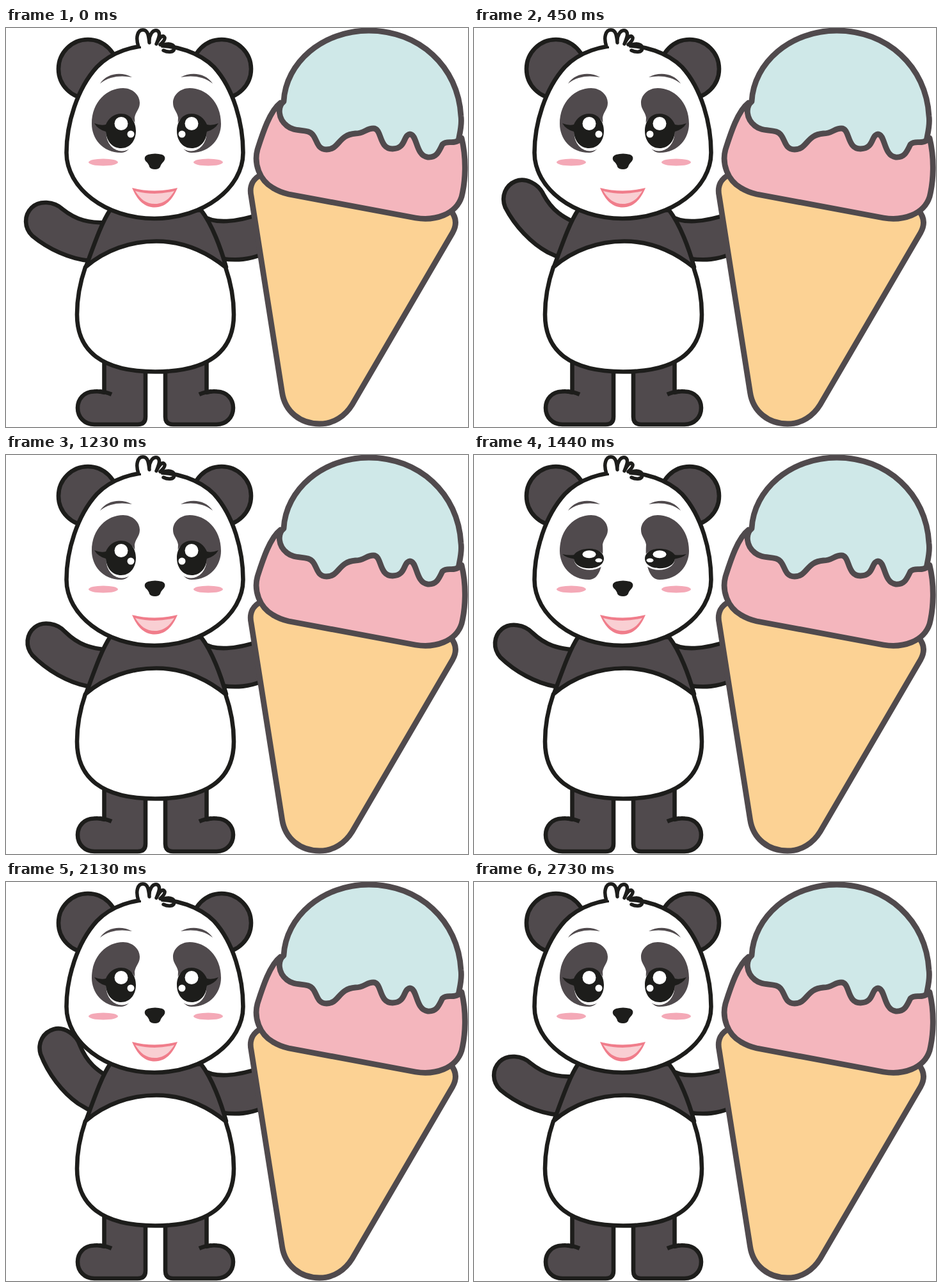
These frames come from a looping animation (722 px wide and 624 px high, 2.76 s). An HTML page:

```html
<!DOCTYPE html>
<html lang="en">
<head>
<meta charset="utf-8">
<title>Waving panda with ice cream</title>
<style>
  html, body { margin: 0; width: 100%; height: 100%; overflow: hidden; background: #fff; }
  svg { display: block; width: 100%; height: 100%; }
  .line { stroke: #1d1d1b; stroke-width: 6.6; stroke-linecap: round; stroke-linejoin: round; }
  .ice { stroke: #504a4d; stroke-width: 8.8; stroke-linejoin: round; }
  .hair { stroke: #1d1d1b; stroke-width: 5.5; stroke-linecap: round; stroke-linejoin: round; }
  .fur { fill: #504a4d; }
  .white { fill: #fff; }
  .ink { fill: #1d1d1b; }
  .none { fill: none; }
</style>
</head>
<body>
<svg viewBox="0 0 722 624">
  <defs>
    <g id="leg" class="line">
      <path class="fur" d="M153.500 515V570C148 568 143 568 137 568.5C122 569 112 580 112 594C112 609 123 620 138 620H206Q218 620 218 608V515Z"/>
      <path class="none" stroke-linecap="butt" d="M146 568.500Q156 569 165 573"/>
    </g>
    <g id="patch" class="fur">
      <path d="M183 94C198 94 209 105 209 117C209 127 203 130 201 140C203 172 196 195 180 195C150 195 134 172 134 150C134 115 158 94 183 94Z"/>
      <path d="M147 87C158 70 181 68 197 77C180 74 162 75 147 87Z"/>
    </g>
    <g id="eye">
      <ellipse class="white" cx="181" cy="164" rx="24.500" ry="28.500"/>
      <path class="ink" d="M138 149Q148 153 156 151C160 141 169 134 180 134C195 134 203 147 203 161C203 177 193 188 180 188C167 188 157 178 156 162Q144 159 138 149Z"/>
      <circle class="white" cx="180" cy="149.500" r="10.500"/>
      <circle class="white" cx="195" cy="166" r="5.500"/>
    </g>
  </defs>

  <g class="line">
    <path id="arm" class="fur" d="M175 304C127 307 108 299 88 283C75 271 52 269 40 281C28 293 28 312 41 325C66 346 100 361 130 364L165 365Z"/>
    <path class="fur" d="M306 293C325 307 360 304 400 290V354C380 362 362 364 338 361Z"/>
  </g>
  <use href="#leg"/>
  <use href="#leg" transform="translate(467) scale(-1 1)"/>
  <g class="line">
    <path class="fur" d="M163 284C149 305 138 338 125 373L344 374C336 345 322 307 305 285Z"/>
    <path class="white" d="M124 374C155 347 195 333.500 235 333.500C275 333.500 312 349 343 374C352 400 356 425 356 448C356 505 318 537.500 233 537.500C150 537.500 111 505 111 448C111 425 115 400 124 374Z"/>
    <circle class="fur" cx="128" cy="64" r="46"/>
    <circle class="fur" cx="337" cy="64" r="46"/>
    <path class="white" d="M232 27C200 27 165 37 142 61C111 95 94.500 150 94.500 195C94.500 250 155 298 232 298C309 298 370.500 250 370.500 195C370.500 150 356 95 325 61C302 38 266 27 232 27Z"/>
  </g>
  <path class="white" d="M211 20H238L245 36H211Z"/>
  <g class="hair">
    <path class="white" d="M207 29C202 14 206 3 214 3C222 3 223 13 224 23C223 12 229 2 236 4C243 7 238 17 235 25C239 16 245 9 248 15C249 19 244 23 241 26"/>
    <path class="none" d="M245 27C253 23 263 25 263 32C262 39 252 38 246 35"/>
  </g>

  <use href="#patch"/>
  <use href="#patch" transform="translate(470) scale(-1 1)"/>
  <g id="eyes">
    <use href="#eye"/>
    <use href="#eye" transform="translate(470) scale(-1 1)"/>
  </g>
  <path class="ink" d="M222 198Q233 195 244 198Q251 201 247 208Q242 213 241 217Q239 221 233 221Q226 221 224 217Q223 212 218 208Q214 201 222 198Z"/>
  <g fill="#f4a9b7">
    <ellipse cx="152" cy="210" rx="23" ry="5.500"/>
    <ellipse cx="316" cy="210" rx="23" ry="5.500"/>
  </g>
  <path fill="#f07d8b" d="M197 250Q232 259 268 250C260 269 249 280.500 232.500 280.500C216 280.500 205 269 197 250Z"/>
  <path fill="#f9cfd3" d="M202 255Q232 263 263 255C255 268 246 275 232.500 275C219 275 210 268 202 255Z"/>

  <g class="ice">
    <path fill="#fcd294" d="M400 229C386 235 380 247 383 262L431.500 570C436 600 460 619 490 619C512 619 530 607 541 589L698 320C705 307 704 296 695 286Z"/>
    <path fill="#f4b6bd" d="M429 117C412 130 401 165 393 190C387 212 396 238 417 250C425 255 433 258 442 260L640 297C670 302 703 292 712 264C718 240 720 205 712 172Z"/>
    <path fill="#cfe8e8" d="M434 115C437 54 495 4 567 4C645 4 707 60 711 138C713 152 709 165 707 176C698 182 690 175 682 182C676 195 672 203 659 202C640 200 643 166 631 166C620 168 626 188 604 189C582 189 588 157 574 157C563 157 560 165 546 165C519 167 521 190 501 190C482 190 488 167 472 162C460 159 449 161 439 153C425 142 424 123 434 115Z"/>
  </g>
</svg>
<script>
  const LOOP = 2760, STEP = 30, SWING = 33.5;
  const turns = [0, 660, 1350, 2040, 2730]; // arm alternates down / up
  const blink = { at: 1380, half: 105 };
  const arm = document.getElementById('arm');
  const eyes = document.getElementById('eyes');

  function armAngle(t) {
    const next = turns.findIndex(turn => t < turn);
    if (next < 0) return 0;
    const p = (t - turns[next - 1]) / (turns[next] - turns[next - 1]);
    return SWING * (next % 2 ? p : 1 - p);
  }

  function draw(now) {
    const t = Math.floor((now % LOOP) / STEP) * STEP;
    arm.setAttribute('transform', `rotate(${armAngle(t)} 155 322)`);
    const open = Math.max(0.1, Math.min(1, Math.abs(t - blink.at) / blink.half));
    eyes.setAttribute('transform', `translate(0 163) scale(1 ${open}) translate(0 -163)`);
  }

  const start = performance.now();
  function tick() {
    draw(performance.now() - start);
    requestAnimationFrame(tick);
  }
  tick();
</script>
</body>
</html>
```
